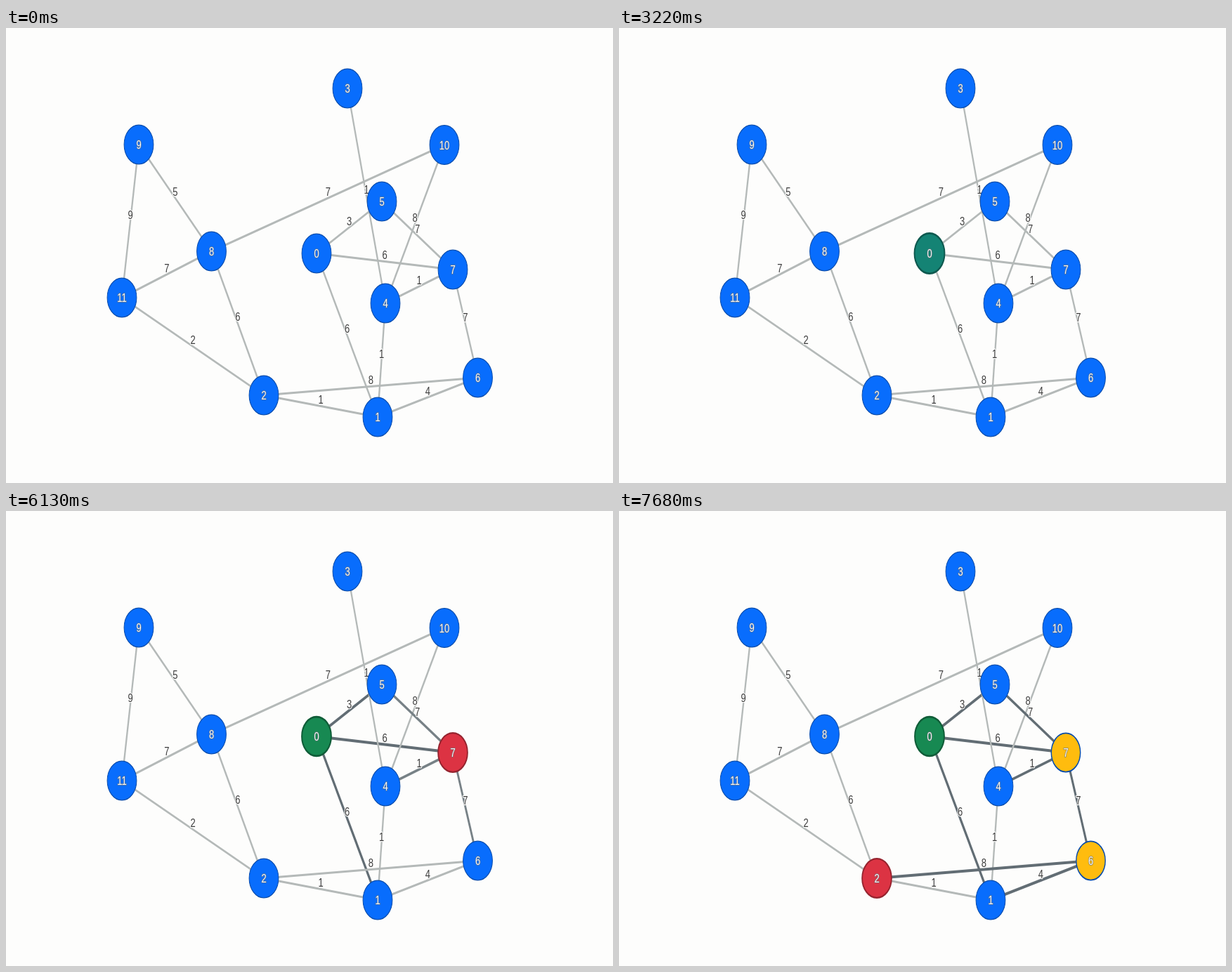
These frames come from a looping animation (864x648 px, 8 s). An HTML page with a canvas:

```html
<!DOCTYPE html>
<html lang="en">
<head>
<meta charset="utf-8">
<title>Graph traversal</title>
<style>
html, body { margin: 0; width: 100%; height: 100%; overflow: hidden; background: #fdfdfc; }
canvas { display: block; }
</style>
</head>
<body>
<canvas id="stage" width="864" height="648"></canvas>
<script>
const ctx = document.getElementById('stage').getContext('2d');
const LOOP = 8000;
const FADE = 500;
const STRETCH = 4 / 3; // the whole scene is taller than wide
const PAPER = '#fdfdfc';

// A node knows its centre and its links: { neighbour: weight }
const node = (x, y, links = {}) => ({ x, y: y / STRETCH, links });
const nodes = [
  node(442, 321, { 1: 6, 5: 3, 7: 6 }),
  node(529, 554, { 2: 1, 4: 1, 6: 4 }),
  node(367, 523, { 6: 8, 8: 6, 11: 2 }),
  node(486, 86, { 4: 1 }),
  node(540, 392, { 7: 1, 10: 8 }),
  node(535, 247, { 7: 7 }),
  node(671.5, 498, { 7: 7 }),
  node(636, 344),
  node(292.5, 318, { 9: 5, 10: 7, 11: 7 }),
  node(189, 166, { 11: 9 }),
  node(624, 166.5),
  node(165, 384)
];
const edges = nodes.flatMap((from, a) =>
  Object.entries(from.links).map(([b, weight]) => ({ a, b: +b, weight })));

// The walk: when each node becomes the current one
const visits = [{ id: 0, at: 2820 }, { id: 7, at: 4890 }, { id: 6, at: 6130 }, { id: 2, at: 7180 }];
const expandAt = index => 4510 + 1250 * index; // then its edges darken
const HOVER_AT = 2100;

const progress = (t, start, length = FADE) => Math.min(1, Math.max(0, (t - start) / length));
const mix = (a, b, p) => Array.isArray(a) ? a.map((v, i) => mix(v, b[i], p)) : a + (b - a) * p;
const blend = (a, b, p) =>
  Object.fromEntries(Object.keys(a).map(key => [key, mix(a[key], b[key], p)]));
const css = color => `rgb(${color.map(Math.round).join()})`;
const shade = color => color.map(v => v * 0.68);

const blue = [8, 109, 253], green = [23, 137, 82], red = [220, 51, 67], yellow = [255, 188, 14];
const look = (fill, border, width, radius) => ({ fill, border: shade(border), width, radius });
const IDLE = look(blue, blue, 1, 21.4);
const HOVER = look(blue, blue, 2, 24.5);
const START = look(green, green, 2, 21.9);
const CURRENT = look(red, red, 1.8, 21.8);
const VISITED = look(yellow, blue, 1.4, 21.4);
const LIGHT_EDGE = { color: [180, 185, 184], width: 2.3 };
const DARK_EDGE = { color: [98, 109, 116], width: 3 };

function nodeLook(id, t) {
  const index = visits.findIndex(visit => visit.id === id);
  if (index < 0) return IDLE;
  const arrived = progress(t, visits[index].at);
  if (index === 0) return blend(blend(IDLE, HOVER, progress(t, HOVER_AT, 30)), START, arrived);
  const next = visits[index + 1];
  return blend(blend(IDLE, CURRENT, arrived), VISITED, next ? progress(t, next.at) : 0);
}

function edgeLook({ a, b }, t) {
  const index = visits.findIndex(({ id }) => id === a || id === b);
  return index < 0 ? LIGHT_EDGE : blend(LIGHT_EDGE, DARK_EDGE, progress(t, expandAt(index)));
}

function label(text, x, y, fill, outline, outlineWidth) {
  ctx.lineWidth = outlineWidth;
  ctx.strokeStyle = outline;
  ctx.strokeText(text, x, y + 4.5);
  ctx.fillStyle = fill;
  ctx.fillText(text, x, y + 4.5);
}

function drawEdge(edge, t) {
  const { color, width } = edgeLook(edge, t);
  const from = nodes[edge.a], to = nodes[edge.b];
  ctx.strokeStyle = css(color);
  ctx.lineWidth = width;
  ctx.beginPath();
  ctx.moveTo(from.x, from.y);
  ctx.lineTo(to.x, to.y);
  ctx.stroke();
}

function drawWeight({ a, b, weight }) {
  const x = (nodes[a].x + nodes[b].x) / 2;
  const y = (nodes[a].y + nodes[b].y) / 2 - 7;
  label(weight, x, y, '#3c3c3c', PAPER, 2);
}

function drawNode({ x, y }, id, t) {
  const { fill, border, width, radius } = nodeLook(id, t);
  ctx.beginPath();
  ctx.arc(x, y, radius - width / 2, 0, 2 * Math.PI);
  ctx.fillStyle = css(fill);
  ctx.fill();
  ctx.strokeStyle = css(border);
  ctx.lineWidth = width;
  ctx.stroke();
  label(id, x, y, '#f4f6f8', 'rgba(110, 115, 120, 0.65)', 1.6);
}

function draw(t) {
  ctx.setTransform(1, 0, 0, STRETCH, 0, 0);
  ctx.fillStyle = PAPER;
  ctx.fillRect(0, 0, 864, 486);
  ctx.font = '13px "Liberation Sans", Arial, sans-serif';
  ctx.textAlign = 'center';
  ctx.lineJoin = 'round';
  edges.forEach(edge => drawEdge(edge, t));
  edges.forEach(drawWeight);
  nodes.forEach((item, id) => drawNode(item, id, t));
}

const startTime = performance.now();
function tick() {
  draw((performance.now() - startTime) % LOOP);
  requestAnimationFrame(tick);
}
tick();
</script>
</body>
</html>
```
